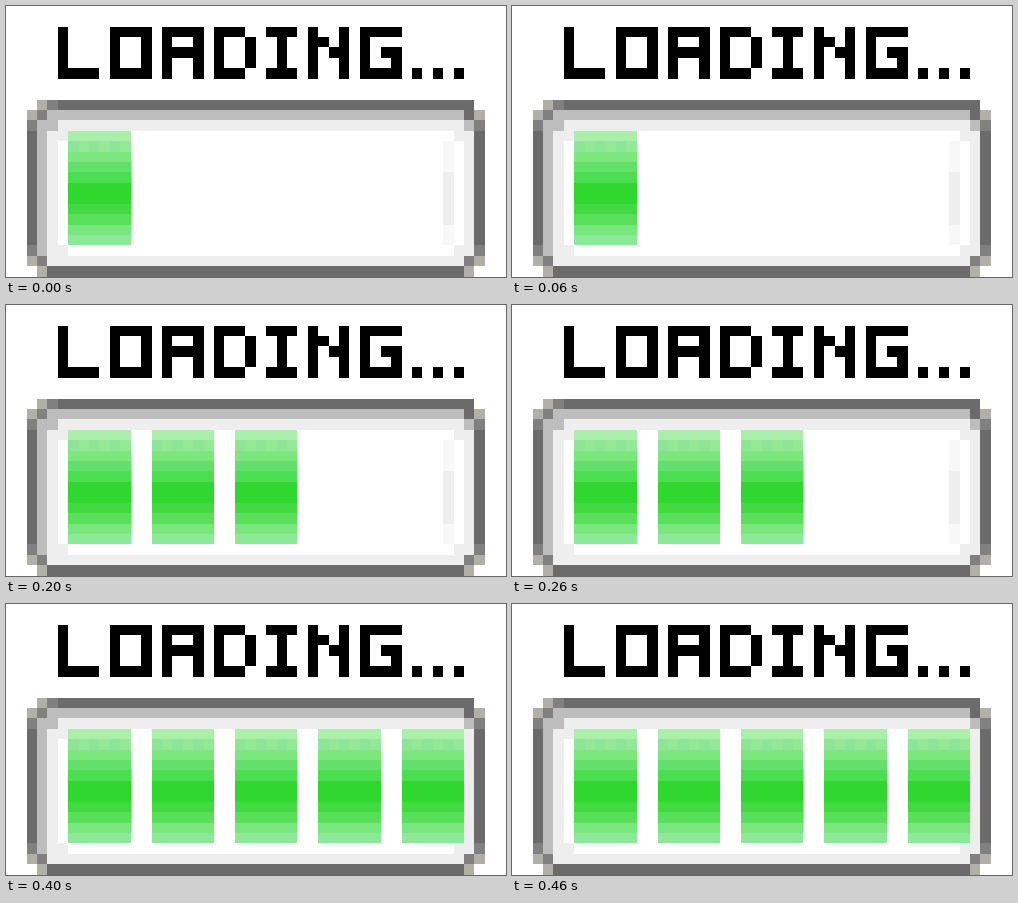
An HTML page with a canvas that plays this animation: 500x271 px, repeating every 500 ms.

```html
<!DOCTYPE html>
<html lang="en">
<head>
<meta charset="utf-8">
<title>Loading</title>
<style>
  html, body { margin: 0; width: 500px; height: 271px; overflow: hidden; background: #fff; }
  canvas { display: block; }
</style>
</head>
<body>
<canvas id="stage" width="500" height="271" role="img" aria-label="LOADING..."></canvas>
<script>
const ctx = document.getElementById('stage').getContext('2d');
const COLS = 48, ROWS = 26, STEP = 100, BARS = 5;
const DARK = '#6b6b6b', MID = '#bdbdbd', PALE = '#eeeeee', FAINT = '#f8f8f8',
      CORNER = '#b0b0a8', SOFT = '#808080';

// Grid lines snap mostly downwards to whole pixels
const px = c => Math.floor(c * 500 / COLS + 0.2);
const py = r => Math.floor(r * 271 / ROWS + 0.2);

// Fill a block of grid cells
function cells(c, r, w, h, color) {
  ctx.fillStyle = color;
  ctx.fillRect(px(c), py(r), px(c + w) - px(c), py(r + h) - py(r));
}

const GLYPHS = {
  L: ['#', '#', '#', '#', '####'],
  O: ['####', '#  #', '#  #', '#  #', '####'],
  A: ['####', '#  #', '####', '#  #', '#  #'],
  D: ['### ', '#  #', '#  #', '#  #', '### '],
  I: ['###', ' # ', ' # ', ' # ', '###'],
  N: ['#  #', '## #', '# ##', '#  #', '#  #'],
  G: ['####', '#   ', '# ##', '#  #', '####'],
  '.': ['', '', '', '', '#']
};

function drawTitle() {
  let col = 5;
  for (const ch of 'LOADING...') {
    const rows = GLYPHS[ch];
    rows.forEach((row, y) => [...row].forEach((dot, x) => {
      if (dot === '#') cells(col + x, 2 + y, 1, 1, '#000');
    }));
    col += Math.max(...rows.map(row => row.length)) + 1;
  }
}

function drawFrame() {
  // Outer edge
  cells(4, 9, 41, 1, DARK);
  cells(4, 25, 40, 1, DARK);
  cells(2, 11, 1, 13, DARK);
  cells(45, 11, 1, 13, DARK);
  // Bevel
  cells(4, 10, 40, 1, MID);
  cells(3, 11, 1, 13, MID);
  cells(4, 11, 40, 1, PALE);
  cells(4, 12, 1, 12, PALE);
  cells(44, 12, 1, 12, PALE);
  cells(4, 24, 40, 1, PALE);
  for (const c of [5, 43]) for (const r of [12, 23]) cells(c, r, 1, 1, PALE);
  // Corners
  cells(3, 9, 1, 1, CORNER);
  cells(4, 9, 1, 1, SOFT);
  cells(3, 10, 1, 1, SOFT);
  cells(44, 10, 1, 1, DARK);
  for (const [outer, inner] of [[2, 3], [45, 44]]) {
    cells(outer, 10, 1, 1, CORNER);
    cells(outer, 11, 1, 1, SOFT);
    cells(outer, 23, 1, 1, SOFT);
    cells(outer, 24, 1, 1, CORNER);
    cells(inner, 24, 1, 1, SOFT);
    cells(inner, 25, 1, 1, CORNER);
  }
  for (const c of [4, 44]) cells(c, 11, 1, 1, MID);
  // Reflection
  cells(42, 13, 1, 10, FAINT);
  cells(42, 16, 1, 5, PALE);
}

const SHADES = ['#aaf0aa', '#95e896', '#7ce77d', '#63df6b', '#4ade50', '#30d72f',
                '#30d72f', '#43d943', '#59df59', '#7ae67e', '#8de898'];

function drawBar(i) {
  const col = 6 + i * 8;
  SHADES.forEach((shade, y) => cells(col, 12 + y, 6, 1, shade));
  for (let x = 0; x < 6; x += 2) cells(col + x, 13, 1, 1, '#8de598');
}

function draw(ms) {
  ctx.fillStyle = '#fff';
  ctx.fillRect(0, 0, 500, 271);
  drawTitle();
  drawFrame();
  const count = Math.floor(ms / STEP) % BARS + 1;
  for (let i = 0; i < count; i++) drawBar(i);
}

const start = performance.now();
function tick() {
  draw(performance.now() - start);
  requestAnimationFrame(tick);
}
tick();
</script>
</body>
</html>
```
